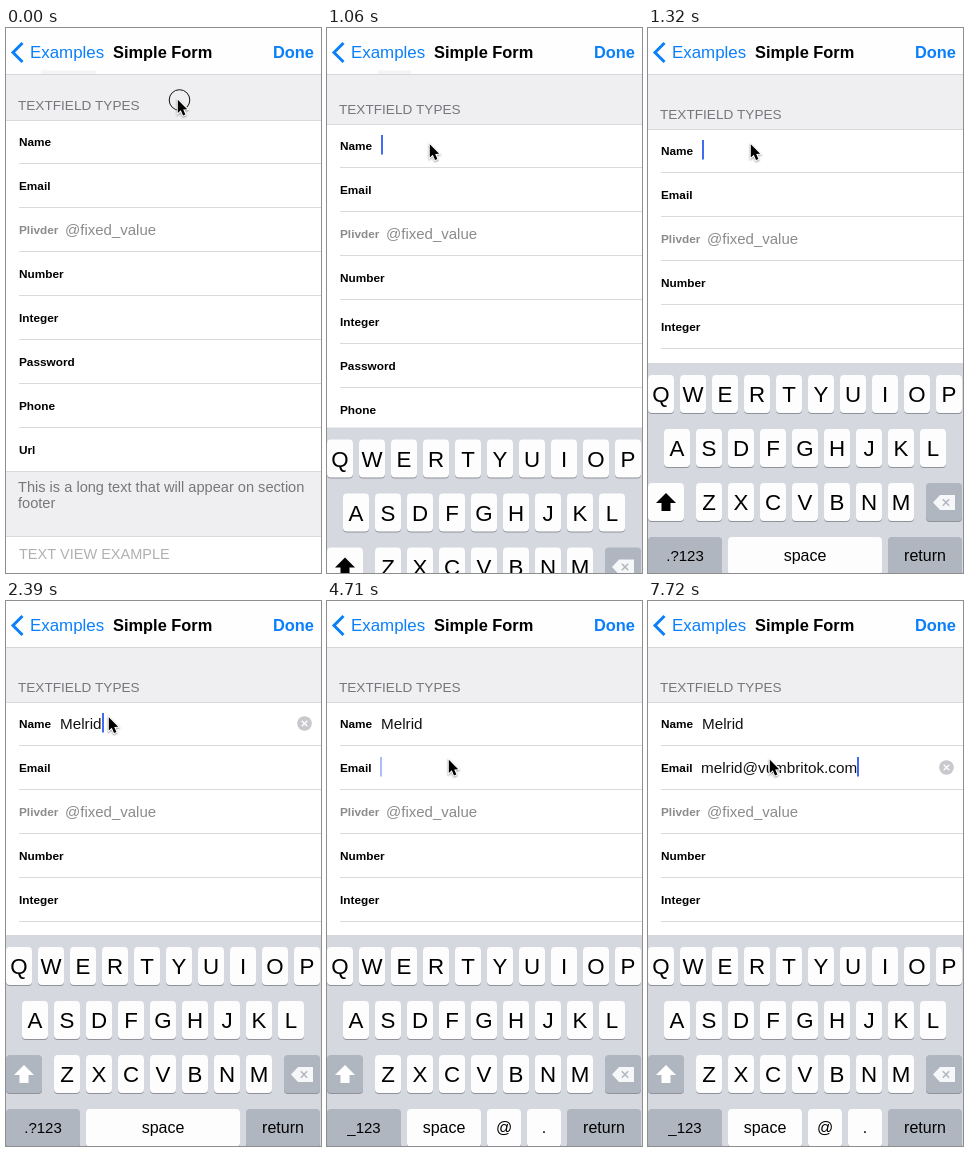
An HTML page with a canvas that plays this animation: 315 px wide and 545 px high, repeating every 8000 ms.

```html
<!DOCTYPE html>
<html lang="en">
<head>
<meta charset="utf-8">
<title>Simple Form</title>
<style>
html, body { margin: 0; width: 100%; height: 100%; overflow: hidden; background: #fff; }
canvas { display: block; width: 315px; height: 545px; }
</style>
</head>
<body>
<canvas id="stage" width="315" height="545"></canvas>
<script>
const ctx = document.getElementById('stage').getContext('2d');
const W = 315, H = 545;
// The picture advances in even ticks; all times below are in ticks.
const LOOP = 8000, TICKS = 90;
const BLUE = '#0a7ffb', GRAY = '#8b8b8d', HEAD = '#77777b', LINE = '#dadade';
const KEY_GRAY = '#b0b6c0', KEY_WHITE = '#fdfdfe';

const LABELS = ['Name', 'Email', 'Plivder', 'Number', 'Integer', 'Password', 'Phone', 'Url'];
const HANDLE = '@fixed_value';

// bursts: typed characters, start, gap between keys
const NAME = { row: 0, x: 54, focus: 11, bursts: [['Me', 21, 1], ['lrid', 24, 1]] };
const EMAIL = {
  row: 1, x: 53, focus: 44,
  bursts: [['me', 54, 0], ['lri', 60, 2], ['d@', 65, 5], ['vu', 72, 2],
           ['mb', 74, 2], ['ritok', 78, 1], ['.com', 84, 1]]
};

const HOME = { x: 171, y: 71 };
const MOVES = [
  { from: 0, to: 2, x: 102, y: 77 },
  { from: 4, to: 8, x: 102, y: 115.5 },
  { from: 38, to: 42, x: 121, y: 158 }
];
const TAPS = [0, 10, 43];
const KEYBOARD_START = 10.54;

const clamp = v => Math.max(0, Math.min(1, v));
const smooth = v => { const p = clamp(v); return p * p * (3 - 2 * p); };
const settle = s => (1 + s) * Math.exp(-s);

function rect(x, y, w, h, color) {
  ctx.fillStyle = color;
  ctx.fillRect(x, y, w, h);
}

function text(str, x, y, size, color, bold, align = 'left') {
  ctx.font = `${bold ? 'bold ' : ''}${size}px "Liberation Sans", Arial, sans-serif`;
  ctx.fillStyle = color;
  ctx.textAlign = align;
  ctx.fillText(str, x, y);
}

function path(points, close) {
  ctx.beginPath();
  points.forEach(([x, y]) => ctx.lineTo(x, y));
  if (close) ctx.closePath();
}

function fill(color) {
  ctx.fillStyle = color;
  ctx.fill();
}

function stroke(color, width) {
  ctx.strokeStyle = color;
  ctx.lineWidth = width;
  ctx.stroke();
}

function cross(x, y, r, color, width) {
  for (const d of [-r, r]) {
    path([[x - r, y - d], [x + r, y + d]]);
    stroke(color, width);
  }
}

function disc(x, y, r) {
  ctx.beginPath();
  ctx.arc(x, y, r, 0, 2 * Math.PI);
}

function nav(scroll) {
  rect(0, 0, W, 46, '#fefefe');
  rect(35 + 40 * scroll, 42.5, 55 * (1 - scroll), 3.5, '#f4f4f5');
  rect(0, 46, W, 1, '#d6d6d9');
  path([[16.5, 15], [7, 24.5], [16.5, 34]]);
  stroke(BLUE, 3);
  text('Examples', 24, 30, 16.9, BLUE);
  text('Simple Form', 107, 30, 16.4, '#000', true);
  text('Done', 267, 30, 16.4, BLUE, true);
}

function form(base) {
  rect(0, 0, W, H, '#efeff2');
  text('TEXTFIELD TYPES', 12, base - 10.5, 13.6, HEAD);
  rect(0, base, W, 352, '#fff');
  rect(0, base, W, 1, LINE);
  LABELS.forEach((label, i) => {
    const top = base + 44 * i, last = i === LABELS.length - 1;
    text(label, 13, top + 26, 11.8, i === 2 ? GRAY : '#000', true);
    rect(last ? 0 : 13, top + 43, W, 1, LINE);
  });
  text(HANDLE, 59, base + 114.5, 15, GRAY);
  text('This is a long text that will appear on section', 12, base + 372, 14.6, HEAD);
  text('footer', 12, base + 388, 14.6, HEAD);
  rect(0, base + 416, W, H, '#fff');
  rect(0, base + 416, W, 1, LINE);
  text('TEXT VIEW EXAMPLE', 13, base + 439, 14.5, '#b0b0b3');
}

function typing(f, n) {
  const keys = f.bursts
    .flatMap(([chars, at, gap]) => [...chars].map((c, i) => ({ c, at: at + i * gap })))
    .filter(k => k.at <= n);
  return { str: keys.map(k => k.c).join(''), last: keys.length ? keys.pop().at : f.focus + 3 };
}

// Solid after each key, then fades out and back in.
function blink(age) {
  if (age < 6) return 1;
  return clamp(Math.max(8 - age, age - 10) / 3) ** 2;
}

function field(f, n, base, active) {
  const top = base + 44 * f.row, { str, last } = typing(f, n);
  text(str, f.x, top + 27, 15.25, '#111');
  if (!active || n <= f.focus) return;
  const end = f.x + ctx.measureText(str).width;
  if (str) {
    disc(298.5, top + 21.5, 7.3);
    fill('#c8c8cd');
    cross(298.5, top + 21.5, 2.8, '#fff', 1.3);
  }
  ctx.globalAlpha = blink(n - last);
  rect(Math.round(end), top + 11, 2, 19.5, '#426bf2');
  ctx.globalAlpha = 1;
}

function key(x, y, w, color = KEY_WHITE) {
  for (const [dy, c] of [[1, '#8f9299'], [0, color]]) {
    ctx.beginPath();
    ctx.roundRect(x, y + dy, w, 38, 4);
    fill(c);
  }
}

function wordKey(label, x, y, w, color, size = 16) {
  key(x, y, w, color);
  text(label, x + w / 2, y + 23.5, size, '#000', false, 'center');
}

function letters(row, x, y) {
  [...row].forEach((c, i) => {
    key(x + 32 * i, y, 26);
    text(c, x + 32 * i + 13, y + 27, 22.3, '#000', false, 'center');
  });
}

function keyboard(y, shift, email) {
  rect(0, y, W, H, '#d5d8df');
  letters('QWERTYUIOP', 0, y + 12);
  letters('ASDFGHJKL', 16, y + 66);
  letters('ZXCVBNM', 48, y + 120);

  const r = y + 120, mid = r + 19.5;
  key(0, r, 36, shift ? KEY_WHITE : KEY_GRAY);
  path([[18, r + 10], [28, r + 20], [8, r + 20]], true);
  fill(shift ? '#000' : '#fff');
  ctx.fillRect(13.5, r + 19, 9, 9);

  key(278, r, 36, KEY_GRAY);
  path([[285, mid], [292, mid - 7.5], [307, mid - 7.5], [307, mid + 7.5], [292, mid + 7.5]], true);
  fill('#f6f7f8');
  cross(298, mid, 3.2, KEY_GRAY, 1.5);

  const b = y + 174;
  wordKey(email ? '_123' : '.?123', 0, b, 74, KEY_GRAY, 15);
  wordKey('space', 80, b, email ? 74 : 154);
  if (email) {
    wordKey('@', 160, b, 34);
    wordKey('.', 200, b, 34);
  }
  wordKey('return', 240, b, 74, KEY_GRAY);
}

function pointer(n) {
  const { x, y } = MOVES.reduce((p, m) => {
    const k = smooth((n - m.from) / (m.to - m.from));
    return { x: p.x + (m.x - p.x) * k, y: p.y + (m.y - p.y) * k };
  }, HOME);
  if (TAPS.includes(n)) {
    disc(x + 2.5, y + 1, 10.3);
    stroke('#111', 1);
  }
  ctx.save();
  ctx.translate(x + .8, y + .8);
  path([[0, 0], [0, 13.2], [3, 10.4], [5.2, 15.6], [7.6, 14.6], [5.4, 9.6], [9.4, 9.4]], true);
  ctx.shadowColor = 'rgba(0, 0, 0, .4)';
  ctx.shadowBlur = 2;
  ctx.shadowOffsetY = 1;
  stroke('#fff', 2);
  ctx.restore();
  fill('#000');
}

function draw(n) {
  const since = Math.max(0, n - KEYBOARD_START);
  const scroll = smooth(since / 3.4);
  const base = 92 + Math.round(9 * scroll);
  const email = n >= EMAIL.focus;

  form(base);
  field(NAME, n, base, !email);
  field(EMAIL, n, base, email);
  nav(scroll);
  if (since) {
    const slide = 211 * settle(1.64 * since);
    keyboard(334 + Math.round(slide * 2) / 2, !typing(NAME, n).str, email);
  }
  pointer(n);
}

const start = performance.now();
function loop() {
  const t = (performance.now() - start) % LOOP;
  draw(Math.floor((t + 20) * TICKS / LOOP) % TICKS);
  requestAnimationFrame(loop);
}
loop();
</script>
</body>
</html>
```
